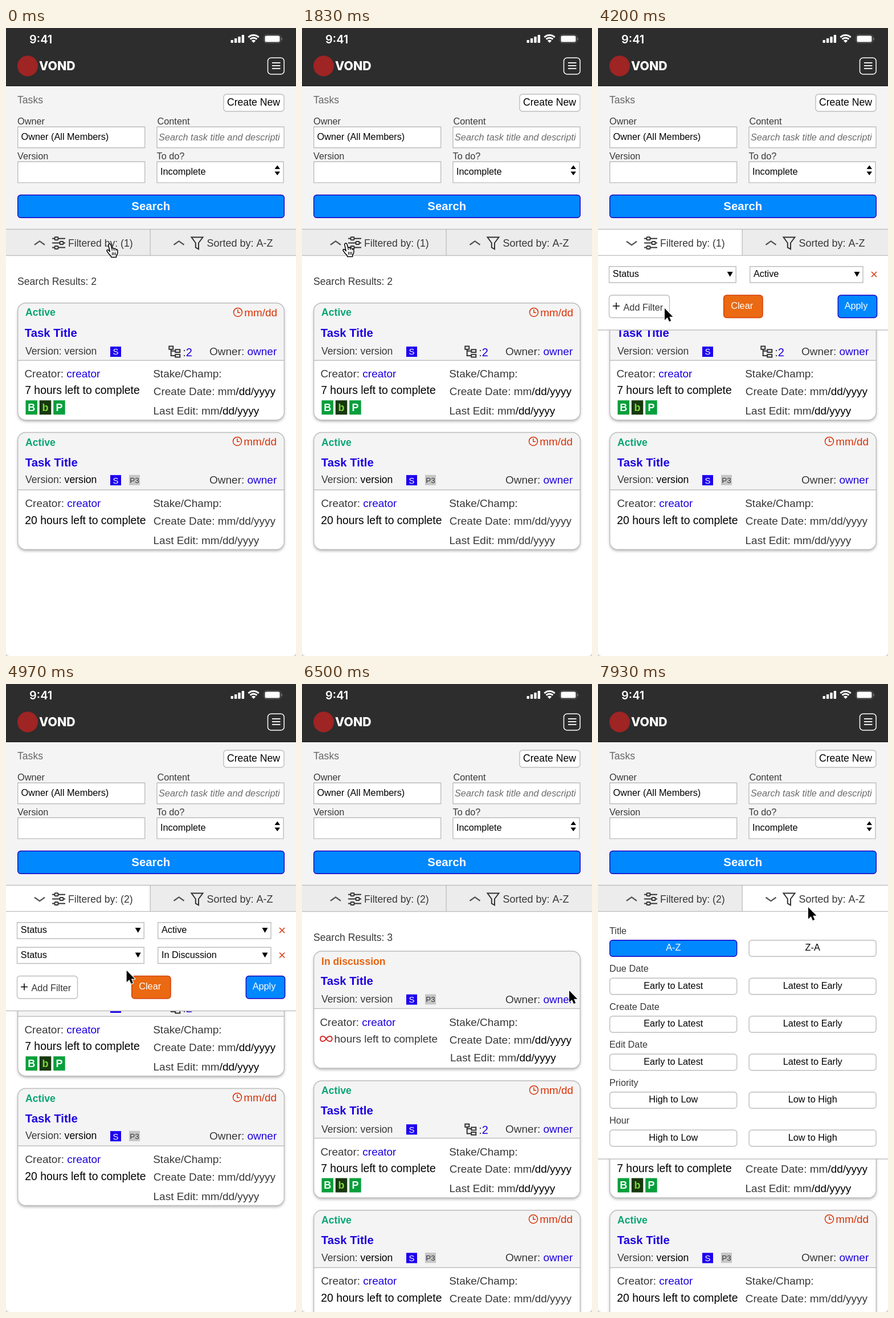
These frames come from a looping animation (509 px wide and 1100 px high, 8000 ms). An HTML page with a canvas:

```html
<!DOCTYPE html>
<html lang="en">
<head>
<meta charset="utf-8">
<title>Task filters</title>
<style>
html, body { margin: 0; width: 100%; height: 100%; overflow: hidden; background: #fff; }
canvas { display: block; width: 509px; height: 1100px; }
</style>
</head>
<body>
<canvas id="stage"></canvas>
<script>
const W = 509, H = 1100, LOOP = 8000, FADE = 240;
const SANS = '"Liberation Sans", Arial, sans-serif';
const INTER = 'Inter, sans-serif';
const INK = '#383838', BLACK = '#000', LINK = '#1c00e0', RED = '#d93208', EDGE = '#bdbdbd';
const BLUE = '#0088ff', NAVY = '#2200c4';
const ratio = window.devicePixelRatio || 1;

function prepare(canvas) {
  canvas.width = W * ratio;
  canvas.height = H * ratio;
  const context = canvas.getContext('2d');
  context.scale(ratio, ratio);
  return context;
}

const stage = prepare(document.getElementById('stage'));
let g = stage;

// --- drawing helpers ---
function text(str, x, y, size, color = INK, { style = '', align = 'left', family = SANS } = {}) {
  g.font = `${style} ${size}px ${family}`;
  g.textAlign = align;
  g.fillStyle = color;
  g.fillText(str, x, y);
  return g.measureText(str).width;
}

function runs(parts, x, y, size) {
  for (const [str, color] of parts) x += text(str, x, y, size, color);
}

function rect(x, y, w, h, color) {
  g.fillStyle = color;
  g.fillRect(x, y, w, h);
}

function box(x, y, w, h, r, fill, edge, width = 1.4) {
  g.beginPath();
  g.roundRect(x, y, w, h, r);
  if (fill) { g.fillStyle = fill; g.fill(); }
  if (edge) { g.strokeStyle = edge; g.lineWidth = width; g.stroke(); }
}

function stroke(d, color, width) {
  g.strokeStyle = color;
  g.lineWidth = width;
  g.stroke(new Path2D(d));
}

function fill(d, color) {
  g.fillStyle = color;
  g.fill(new Path2D(d));
}

function circle(x, y, r, color) {
  g.beginPath();
  g.arc(x, y, r, 0, 7);
  g.fillStyle = color;
  g.fill();
}

function at(x, y, draw) {
  g.save();
  g.translate(x, y);
  draw();
  g.restore();
}

// --- page parts ---
function header() {
  rect(0, 0, W, 102, '#2d2d2d');
  rect(0, 100.5, W, 1.5, '#222');
  text('9:41', 41, 26.5, 20, '#fff', { style: '600', family: INTER });
  for (let i = 0; i < 4; i++) box(394.5 + i * 6.4, 21 - i * 3, 4.4, 5 + i * 3, 1, '#fff');
  for (const r of [13, 8.3]) {
    g.beginPath();
    g.arc(434.5, 25.5, r, -Math.PI * 0.75, -Math.PI * 0.25);
    g.strokeStyle = '#fff';
    g.lineWidth = 3;
    g.stroke();
  }
  fill('M434.5 26 L430.8 22.2 Q434.5 19.4 438.2 22.2 Z', '#fff');
  box(452.7, 11.8, 29.6, 14.4, 4, null, '#5c5c5c', 1);
  box(454.5, 13.5, 26, 11, 2.6, '#fff');
  rect(483.3, 17, 1.5, 4.5, '#777');
  circle(38, 66.5, 18, '#9f2424');
  text('VOND', 58, 74, 21.3, '#fff', { style: '800', family: INTER });
  box(459.5, 52.3, 28.6, 28.6, 5.5, null, '#fff', 1.5);
  for (const y of [61, 66, 71]) rect(467, y - 0.9, 14.5, 1.8, '#fff');
}

function form() {
  rect(0, 101.5, W, 251, '#f4f4f4');
  text('Tasks', 20, 132, 17.64, '#666');
  box(382, 116, 106, 30, 5, '#fff', EDGE);
  text('Create New', 434.5, 136, 17.64, BLACK, { align: 'center' });
  text('Owner', 20, 168.5, 16.3);
  text('Content', 265.5, 168.5, 16.3);
  text('Version', 20, 229.5, 16.3);
  text('To do?', 264.5, 229.5, 16.3);
  box(20.7, 173.2, 223, 36.6, 0, '#fff', EDGE);
  box(265, 173.2, 223, 36.6, 0, '#fff', EDGE);
  box(20.7, 234.3, 223, 36.6, 0, '#fff', EDGE);
  box(265, 234.3, 222, 36.6, 0, '#fff', EDGE);
  text('Owner (All Members)', 26.5, 196, 16.3, BLACK);
  text('Search task title and descripti', 268, 196.5, 16.3, '#6c6c6c', { style: 'italic' });
  text('Incomplete', 271, 257, 16.3, BLACK);
  fill('M471.5 247 L476.3 240.5 L481 247 Z M471.5 251.5 L476.3 258 L481 251.5 Z', BLACK);
  box(20.7, 292.5, 467.6, 39.8, 5, BLUE, NAVY, 1.4);
  text('Search', 254.3, 318.6, 20.36, '#fff', { style: 'bold', align: 'center' });
}

function chevron(x, open) {
  const [side, mid] = open ? [373.7, 380.2] : [379.8, 373.3];
  stroke(`M${x - 9} ${side} L${x} ${mid} L${x + 9} ${side}`, '#555', 2.3);
}

function tabs({ count, panel }) {
  const filterOpen = panel === 'filter', sortOpen = panel === 'sort';
  rect(0, 352.5, 253, 46, filterOpen ? '#fff' : '#ececec');
  rect(253, 352.5, 256, 46, sortOpen ? '#fff' : '#ececec');
  rect(0, 351.8, W, 1.4, EDGE);
  rect(0, 397.8, W, 1.4, EDGE);
  rect(252.5, 352, 1.3, 46, EDGE);
  chevron(59, filterOpen);
  chevron(303.5, sortOpen);
  for (const [y, knob] of [[368.7, 88.5], [376.6, 97.5], [384.5, 88.5]]) {
    stroke(`M81 ${y} H${knob - 3} M${knob + 3} ${y} H104`, '#333', 2);
    box(knob - 3, y - 2.5, 6, 5, 1, null, '#333', 2);
  }
  text(`Filtered by: (${count})`, 109, 383, 17.64);
  stroke('M325.5 366.5 H345.5 L338 376.5 V387.3 L332.8 384.5 V376.5 Z', '#333', 2);
  text('Sorted by: A-Z', 352.5, 383, 18);
}

function badge(x, y, w, h, label, back, color, size, style) {
  rect(x, y, w, h, back);
  text(label, x + w / 2, y + h / 2 + size * 0.36, size, color, { style, align: 'center' });
}

function treeIcon() {
  const color = '#333';
  box(1, 0.8, 7, 5.2, 0, null, color, 2);
  box(12, 6.6, 8, 4.8, 0, null, color, 2);
  box(12, 15, 8, 4.8, 0, null, color, 2);
  stroke('M4.4 6 V17.4 H12 M4.4 9 H12', color, 2);
}

// Cards share one layout; `nudge` holds the small offsets of single rows.
function card(top, c) {
  const n = Object.assign({ status: 0, due: 0, row: 0, creator: 0, hours: 0, made: 0, edit: 0 }, c.nudge);
  const date = c.grayDates ? INK : BLACK;
  at(0, top, () => {
    g.save();
    g.shadowColor = 'rgba(0,0,0,.3)';
    g.shadowBlur = 5 * ratio;
    g.shadowOffsetY = 2.5 * ratio;
    box(20.7, 0, 467.6, 205, 14, '#fff');
    g.restore();
    box(20.7, 0, 467.6, 100.5, [14, 14, 0, 0], '#f4f4f4');
    rect(20.7, 99.8, 467.6, 1.4, EDGE);
    box(20.7, 0, 467.6, 205, 14, null, EDGE);
    text(c.status, 34, 22.5 + n.status, 17.64, c.color, { style: 'bold' });
    if (c.due) at(c.due, 16.2 + n.due, () => {
      g.beginPath();
      g.arc(0, 0, 7.5, 0, 7);
      g.strokeStyle = RED;
      g.lineWidth = 1.5;
      g.stroke();
      stroke('M0 -4.8 V0.5 H4.2', RED, 1.5);
      text('mm/dd', 11.2, 7.1, 18.9, RED);
    });
    text('Task Title', c.titleX - 0.3, 59.2, 20.36, LINK, { style: 'bold' });
    runs([['Version: ', INK], ['version', c.blackVersion ? BLACK : INK]], 34, 90.5 + n.row, 17.64);
    badge(183, 76.3 + n.row, 19, 18, 'S', '#1c00f0', '#fff', 15);
    if (c.p3) badge(216, 76 + n.row, 19, 18, 'P3', '#c6c6c6', '#333', 13.5);
    if (c.tree) {
      at(285.3, 75, treeIcon);
      runs([[':', INK], ['2', LINK]], 310.3, 93.3, 20);
    }
    runs([['Owner: ', INK], ['owner', LINK]], 357, 91.2 + n.row, 19);
    runs([['Creator: ', INK], ['creator', LINK]], c.titleX - (c.endless ? 1.6 : 0.6), 130.5 + n.creator, 19);
    text('Stake/Champ:', 258.2, 130.5 + n.creator, 19);
    if (c.endless) {
      stroke('M42.5 153.5 C39 148 32.2 147.5 32.2 153.5 C32.2 159.5 39 159 42.5 153.5 C46 148 52.8 147.5 52.8 153.5 C52.8 159.5 46 159 42.5 153.5 Z', '#d21212', 1.7);
      text('hours left to complete', 56.5, 159.6, 19);
    } else {
      text(c.hours + ' hours left to complete', 33.2, 159.7 + n.hours, 19.4, BLACK);
    }
    runs([['Create Date: mm', INK], ['/dd/yyyy', date]], 258.7, 161 + n.made, 19);
    runs([['Last Edit: mm', INK], ['/dd/yyyy', date]], c.endless ? 260 : 258.5, 195 + n.edit, 19);
    if (c.tags) {
      badge(34.5, 170.5, 20.5, 25, 'B', '#089f3c', '#fff', 18, 'bold');
      badge(58.8, 170.5, 20.5, 25, 'b', '#17380f', '#7fd53c', 18, 'bold');
      badge(83.2, 170.5, 20.5, 25, 'P', '#089f3c', '#fff', 18, 'bold');
    }
  });
}

const GREEN = '#0aa574';
const firstTask = { status: 'Active', color: GREEN, due: 407, titleX: 33, tree: true, hours: 7, tags: true };
const secondTask = {
  status: 'Active', color: GREEN, due: 406, titleX: 34, p3: true, blackVersion: true, hours: 20, grayDates: true,
  nudge: { status: 1, due: -0.8, row: -1.7, hours: 0.8 }
};
const discussedTask = {
  status: 'In discussion', color: '#e6640f', titleX: 33, p3: true, endless: true,
  nudge: { status: 1, row: -0.6, creator: 0.9, made: 1.3, edit: -2.3 }
};

function results(count) {
  const shift = count === 3 ? 213.3 : 0;
  text('Search Results: ' + count, 20, 449.8, 17.64);
  if (shift) card(468, discussedTask);
  card(481.7 + shift, firstTask);
  card(708.5 + shift, secondTask);
}

function panelBack(bottom) {
  rect(0, 399.2, W, bottom - 399.2, '#fff');
  rect(0, bottom - 0.7, W, 1.4, EDGE);
}

function select(x, y, w, label) {
  box(x, y, w, 28.3, 0, '#fff', EDGE);
  text(label, x + 6.3, y + 18.4, 16.3, BLACK);
  const tip = x + w - 10.5;
  fill(`M${tip - 5} ${y + 9.3} H${tip + 5} L${tip} ${y + 18} Z`, BLACK);
}

function filterPanel(values) {
  const extra = (values.length - 1) * 43.5;
  panelBack(529 + extra);
  values.forEach((value, i) => {
    const y = 417.7 + i * 43.5;
    select(19.5, y, 222.7, 'Status');
    select(266.7, y, 198.3, value);
    stroke(`M480 ${y + 9.3} l9 9 m0 -9 l-9 9`, RED, 1.5);
  });
  at(0, extra, () => {
    box(19.5, 468, 106, 39.5, 5, '#fff', EDGE);
    stroke('M26 487 H38 M32 481 V493', BLACK, 1.5);
    text('Add Filter', 44.5, 494.7, 16.3);
    box(220.7, 468, 68.3, 39.5, 5, '#ea6912', '#d5420c', 1.5);
    text('Clear', 252.7, 491.8, 16.3, '#fff', { align: 'center' });
    box(421.3, 468, 68.3, 39.5, 5, BLUE, NAVY, 1.5);
    text('Apply', 453, 491.8, 16.3, '#fff', { align: 'center' });
  });
}

function sortPanel() {
  const dates = ['Early to Latest', 'Latest to Early'], levels = ['High to Low', 'Low to High'];
  const rows = [['Title', ['A-Z', 'Z-A']], ['Due Date', dates], ['Create Date', dates],
    ['Edit Date', dates], ['Priority', levels], ['Hour', levels]];
  panelBack(832);
  rows.forEach(([label, options], i) => {
    const y = 448.7 + i * 66.5;
    text(label, 20, y - 11.2, 16.3);
    options.forEach((option, j) => {
      const active = i + j === 0, x = 20.7 + j * 244.4;
      box(x, y, 223, 28.5, 5, active ? BLUE : '#fff', active ? NAVY : EDGE);
      text(option, x + 111.6, y + 18.5, 16.3, active ? '#fff' : BLACK, { align: 'center' });
    });
  });
}

function page(state) {
  const canvas = document.createElement('canvas');
  g = prepare(canvas);
  rect(0, 0, W, H, '#fff');
  results(state.results);
  form();
  header();
  tabs(state);
  if (state.panel === 'filter') filterPanel(state.values);
  if (state.panel === 'sort') sortPanel();
  fill('M0 1093 Q0 1100 7 1100 H0 Z M509 1093 Q509 1100 502 1100 H509 Z', '#d4d4d4');
  return canvas;
}

// --- timeline ---
const states = [
  { start: 0, count: 1, results: 2 },
  { start: 2560, count: 1, results: 2, panel: 'filter', values: ['Active'] },
  { start: 4300, count: 2, results: 2, panel: 'filter', values: ['Active', 'In Discussion'] },
  { start: 5870, count: 2, results: 3 },
  { start: 7170, count: 2, results: 3, panel: 'sort' }
];
for (const state of states) state.image = page(state);

// Pointer moves: start, end, target x, target y.
const moves = [
  [200, 1400, 77, 377],
  [3050, 4100, 117, 491],
  [4600, 5700, 475, 532],
  [5900, 6100, 469, 537],
  [6500, 6870, 369, 391]
];

const clamp = v => Math.min(1, Math.max(0, v));
const ease = v => v * v * (3 - 2 * v);

function pointerAt(t) {
  let x = 182, y = 378;
  for (const [start, end, tx, ty] of moves) {
    const k = ease(clamp((t - start) / (end - start)));
    x += (tx - x) * k;
    y += (ty - y) * k;
  }
  return [x, y];
}

function arrow() {
  const d = 'M0 0 V20.4 L4.8 16 L8 23.2 L11.2 21.8 L8.2 14.7 H14.4 Z';
  stroke(d, '#fff', 2.6);
  fill(d, '#000');
}

function hand() {
  const d = 'M-2.4 1.8 Q-.6 -1.4 1.8 1 L3.8 8 Q6 6.4 7.4 8.8 Q9.8 7.4 11 9.8 Q13.4 9 13.8 12 L14 16 Q13.6 19 11.6 20.8 V23.4 H2.6 L2.2 21.4 Q-1.4 18 -3.4 14.8 Q-6 11.8 -4.6 10.8 Q-2.6 9.8 .3 13.6 Z';
  fill(d, '#fff');
  stroke(d, '#000', 1.5);
  stroke('M3.8 8 L4.4 12 M7.4 8.8 L7.9 12 M11 9.8 L11.2 12.4 M4.6 15 V20 M7.4 15 V20 M10.2 15 V20', '#000', 1.2);
}

function render(t) {
  const index = states.findLastIndex(s => s.start <= t);
  const state = states[index];
  const mix = index ? ease(clamp((t - state.start) / FADE)) : 1;
  g = stage;
  if (mix < 1) g.drawImage(states[index - 1].image, 0, 0, W, H);
  g.globalAlpha = mix;
  g.drawImage(state.image, 0, 0, W, H);
  g.globalAlpha = 1;
  const [x, y] = pointerAt(t);
  const overTab = !state.panel && y > 352 && y < 398;
  g.lineJoin = 'round';
  at(x, y, overTab ? hand : arrow);
}

function tick() {
  render(performance.now() % LOOP);
  requestAnimationFrame(tick);
}

tick();
</script>
</body>
</html>
```
